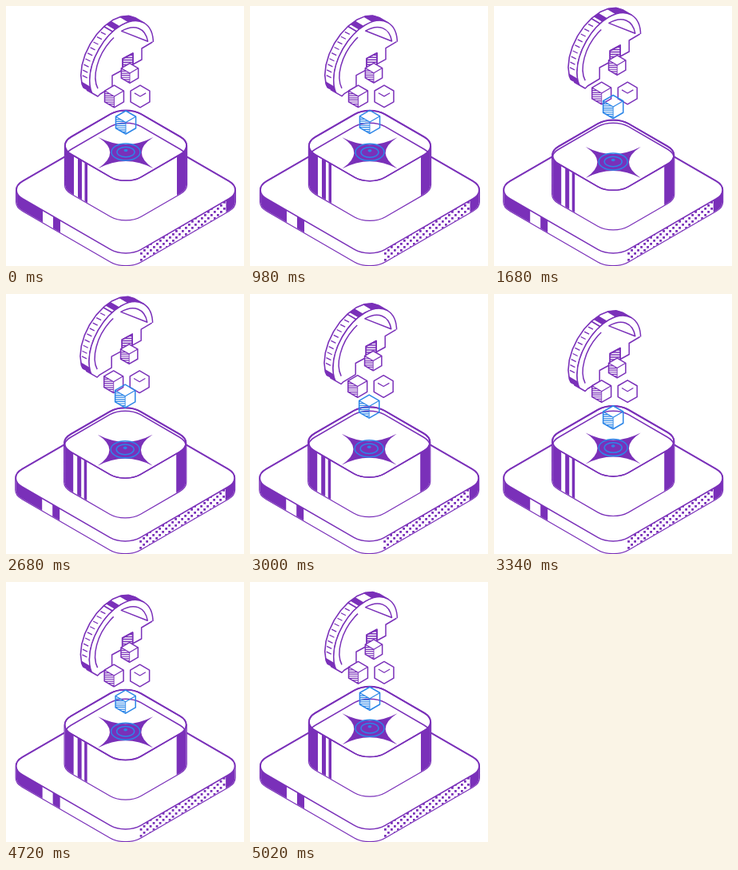
An HTML page with a canvas for the animation above (5.04 s loop, 298 px wide and 325 px high).

```html
<!DOCTYPE html>
<html lang="en">
<head>
<meta charset="utf-8">
<title>Isometric coin</title>
<style>
html, body { margin: 0; width: 100%; height: 100%; overflow: hidden; background: #fff; }
canvas { display: block; }
</style>
</head>
<body>
<canvas id="stage" width="298" height="325"></canvas>
<script>
const ctx = document.getElementById('stage').getContext('2d');
const PURPLE = '#7a30b9', BLUE = '#2c86e8', LINE = 1.5, RAD = Math.PI / 180;
const LOOP = 5040, MOVE = 720, STARTS = [960, 2640, 4320];

// Resting poses: shared x shift, then the vertical place of each part.
const POSES = [
  { x: 0, coin: 0, core: 84, pair: 113, gem: 145.5, box: 0 },
  { x: -.8, coin: -10, core: 74, pair: 109, gem: 126, box: 12 },
  { x: -.8, coin: 9, core: 93, pair: 122, gem: 155, box: 9.5 }
];

function poseAt(t) {
  let from = POSES[0], to = from, k = 0;
  STARTS.forEach((start, i) => {
    if (t < start) return;
    from = POSES[i];
    to = POSES[(i + 1) % 3];
    k = Math.min(1, (t - start) / MOVE);
  });
  const pose = {};
  for (const key in from) pose[key] = from[key] + (to[key] - from[key]) * k;
  return pose;
}

function polygon(points, close = true) {
  const path = new Path2D();
  points.forEach(([x, y]) => path.lineTo(x, y));
  if (close) path.closePath();
  return path;
}

function draw(path, fill, stroke = PURPLE, width = LINE) {
  if (fill) { ctx.fillStyle = fill; ctx.fill(path); }
  if (stroke) { ctx.strokeStyle = stroke; ctx.lineWidth = width; ctx.stroke(path); }
}

function clipped(path, paint) {
  ctx.save();
  ctx.clip(path);
  paint();
  ctx.restore();
}

// Rounded square lying on the isometric ground plane.
function tile(cx, cy, side, radius) {
  const flat = new Path2D(), path = new Path2D();
  flat.roundRect(-side / 2, -side / 2, side, side, radius);
  path.addPath(flat, new DOMMatrix([.866, .5, -.866, .5, cx, cy]));
  return path;
}

function slab(cx, cy, side, radius, height, paintWall) {
  const half = .866 * side - .507 * radius;
  const top = tile(cx, cy, side, radius), body = tile(cx, cy + height, side, radius);
  body.addPath(top);
  body.rect(cx - half, cy, 2 * half, height);
  draw(body, null, PURPLE, 2 * LINE - .6);
  draw(body, '#fff', null);
  clipped(body, paintWall);
  draw(top, '#fff');
  return top;
}

function stripes(cx, y, height, list) {
  ctx.fillStyle = PURPLE;
  list.forEach(([a, b]) => ctx.fillRect(cx + a, y, b - a, height));
}

function base(cx) {
  slab(cx, 230, 170.9, 22, 15, () => {
    stripes(cx, 220, 105, [[-140, -104], [-91, -82], [125.5, 140]]);
    ctx.beginPath();
    for (let col = 0; col < 27; col++)
      for (let y = 236 + col % 2 * 4; y < 325; y += 8)
        ctx.rect(cx + 18 + col * 4, y, 2.8, 2.8);
    ctx.fill();
  });
}

function box(cx, dy) {
  const cy = 174.5 + dy, side = 100.6;
  const rim = slab(cx, cy, side, 22, 49, () =>
    stripes(cx, cy, 100, [[-78, -65], [-60, -55], [-51.5, -48], [64, 78]]));
  // The floor stays put while the walls rise and sink around it.
  clipped(rim, () => draw(tile(cx, 190, side, 22)));
  draw(rim);

  const star = new Path2D(), y = cy + 8.5;
  star.moveTo(cx - 34.5, y - 19);
  star.quadraticCurveTo(cx, y - 1, cx + 34.5, y - 19);
  star.quadraticCurveTo(cx + 5, y, cx + 34.5, y + 20);
  star.quadraticCurveTo(cx, y + 2, cx - 34.5, y + 20);
  star.quadraticCurveTo(cx - 5, y, cx - 34.5, y - 19);
  draw(star, PURPLE, null);
  [[18, 10.5], [11, 6.3]].forEach(([rx, ry]) => {
    const ring = new Path2D();
    ring.ellipse(cx, y - .5, rx, ry, 0, 0, 7);
    draw(ring, null, BLUE);
  });
  const dot = new Path2D();
  dot.ellipse(cx, y - 2.5, 2.4, 1.8, 0, 0, 7);
  draw(dot, BLUE, null);
}

function cube(cx, cy, r, color, fill, hatched) {
  const w = r * .866, h = r / 2;
  ctx.save();
  ctx.translate(cx, cy);
  draw(polygon([[0, -r], [w, -h], [w, h], [0, r], [-w, h], [-w, -h]]), fill, color);
  if (hatched) {
    clipped(polygon([[-w, -h], [0, 0], [0, r], [-w, h]]), () => {
      for (let y = -h + 1; y < r; y += 2.6) draw(polygon([[-w, y], [0, y]], false), null, color, 1.2);
    });
    draw(polygon([[0, 0], [0, r]], false), null, color, .9);
  }
  const edge = hatched ? w : w * .6;
  draw(polygon([[-edge, -edge * .577], [0, 0], [edge, -edge * .577]], false), null, color, 1.2);
  ctx.restore();
}

const FACE = { x: 144.6, y: 70, a: 56.4, b: 32.5 }, DEPTH = [-11, -6.4];
const STAIRS = [[183.5, 45], [170, 53], [170, 67], [159, 73], [159, 59], [146, 66],
  [146, 80], [133, 87], [133, 101], [118, 110], [115, 113], [101, 105]];

// Angle 0 is the upper end of the long axis; it grows over the left side.
function rimPoint(deg, depth) {
  const u = FACE.a * Math.cos(deg * RAD), v = FACE.b * Math.sin(deg * RAD);
  return [FACE.x + u * .5 - v * .866 + DEPTH[0] * depth,
          FACE.y - u * .866 - v * .5 + DEPTH[1] * depth];
}

function rimBand(from, to) {
  const front = [], back = [];
  for (let i = 0; i <= 12; i++) {
    const deg = from + (to - from) * i / 12;
    front.push(rimPoint(deg, 0));
    back.unshift(rimPoint(deg, 1));
  }
  return polygon([...front, ...back]);
}

function faceArc(scale, from, to) {
  const path = new Path2D();
  path.ellipse(FACE.x, FACE.y, FACE.a * scale, FACE.b * scale, -60 * RAD, -from * RAD, -to * RAD);
  return path;
}

function coin(dx, dy) {
  ctx.save();
  ctx.translate(dx, dy);
  clipped(polygon([...STAIRS, [80, 93], [80, 0], [200, 0], [200, 45]]), () => {
    draw(rimBand(0, 180), '#fff', PURPLE, 1.6);
    [[0, 33], [48, 57], [60, 62], [145, 180]].forEach(([a, b]) => draw(rimBand(a, b), PURPLE, null));
    for (let deg = 70; deg < 142; deg += 8) {
      const [x, y] = rimPoint(deg, 1);
      draw(polygon([[x + 2, y + 1], [x + 8, y + 4]], false), null, PURPLE, 1.3);
    }
    draw(faceArc(1, 360, 0), '#fff');
    draw(faceArc(.82, 160, 62));
    const recess = faceArc(.84, 45, -35);
    recess.closePath();
    draw(recess);
  });
  const notch = polygon([[146, 66], [159, 59], [159, 73], [146, 80]]);
  draw(notch, '#fff');
  clipped(notch, () => {
    for (let y = 61.5; y < 80; y += 3) draw(polygon([[146, y], [159, y]], false), null);
  });
  draw(polygon(STAIRS, false));
  ctx.restore();
}

function frame(now) {
  const p = poseAt(now % LOOP), cx = 150 + p.x;
  ctx.fillStyle = '#fff';
  ctx.fillRect(0, 0, 298, 325);
  ctx.lineJoin = 'round';
  base(cx);
  box(cx, p.box);
  coin(p.x, p.coin);
  cube(cx + 5, p.core, 12.3, PURPLE, '#fff', true);
  cube(cx - 14.5, p.pair, 13.8, PURPLE, '#fff', true);
  cube(cx + 18, p.pair, 13.8, PURPLE, '#fff', false);
  cube(cx, p.gem, 14.5, BLUE, null, true);
  requestAnimationFrame(() => frame(performance.now()));
}
frame(0);
</script>
</body>
</html>
```
